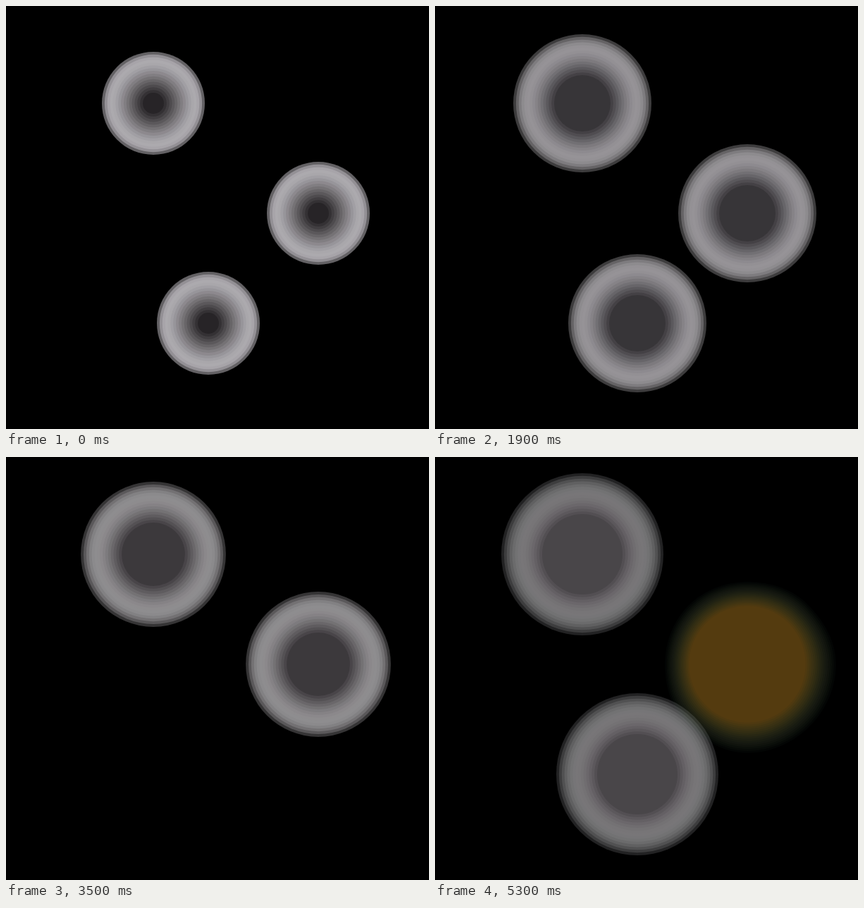
Recreate the animation shown at these times as an HTML page with a canvas. Size 600 by 600 pixels, loop 5400 ms.

```html
<!DOCTYPE html>
<html>
<head>
<meta charset="utf-8">
<title>Ripples</title>
<style>
html, body { margin: 0; width: 100%; height: 100%; overflow: hidden; background: #000; }
canvas { display: block; width: 600px; height: 600px; }
</style>
</head>
<body>
<canvas id="stage" width="600" height="600"></canvas>
<script>
const ctx = document.getElementById('stage').getContext('2d');
const LOOP = 5400, STEP = 100, LAYERS = 16, RAYS = 120, TURN = Math.PI * 2;

// Ripples grow by RANGE px, fade, and start again; the pace drifts a little.
const PACE = [[0, 13], [600, 50], [1200, 74.3], [1900, 114], [4600, 250.5], [5300, 283]];
const MIN_RADIUS = 60, RANGE = 76, DEPTH = 58, FADE_RADIUS = 137;
const LIGHT = [217, 214, 219], DARK = [24, 22, 24];

// Each outline is mirrored about the falling diagonal. Its reach is given every
// eighth of a turn, from lower right over the top to upper left.
const spots = [
  {
    x: 209, y: 138, start: 600, peak: 1200, end: 1900, core: 57, power: 2,
    reach: [101, 112, 91, 78, 85],
    edgeColor: [45, 75, 160], coreColor: [94, 0, 208]
  },
  {
    x: 443, y: 294, start: 3900, peak: 4600, end: 5500, core: 50, power: 2,
    reach: [107, 111, 88, 71, 76],
    edgeColor: [95, 140, 110], coreColor: [250, 127, 4]
  },
  {
    x: 287, y: 450, start: 2000, peak: 2600, end: 3510, core: 39, power: 6,
    reach: [61, 48, 64, 78, 73],
    edgeColor: [185, 38, 95], coreColor: [120, 0, 190]
  }
];

const lerp = (a, b, k) => a + (b - a) * k;
const mix = (a, b, k) => a.map((v, i) => lerp(v, b[i], k));
const rgb = c => `rgb(${c.map(Math.round)})`;
const smooth = k => (1 - Math.cos(Math.PI * k)) / 2;

function keyed(keys, t) {
  let i = 1;
  while (i < keys.length - 1 && t > keys[i][0]) i++;
  const [t0, v0] = keys[i - 1], [t1, v1] = keys[i];
  return lerp(v0, v1, (t - t0) / (t1 - t0));
}

// Reach of an outline at an angle in turns (0..1) from the lower right.
function reachAt(reach, turn) {
  const pos = Math.min(turn, 1 - turn) * 8, i = Math.min(3, Math.floor(pos));
  return lerp(reach[i], reach[i + 1], smooth(pos - i));
}

function drawRipple(spot, radius) {
  ctx.globalAlpha = Math.max(0, 0.0071 * (FADE_RADIUS - radius));
  for (let i = 0; i < LAYERS; i++) {
    const k = i / (LAYERS - 1);
    ctx.fillStyle = rgb(mix(LIGHT, DARK, k));
    ctx.beginPath();
    ctx.arc(spot.x, spot.y, radius - DEPTH * k, 0, TURN);
    ctx.fill();
  }
}

function drawBlob(spot, t) {
  const grow = Math.min(1, (t - spot.start) / (spot.peak - spot.start));
  const fade = Math.max(0, (t - spot.peak) / (spot.end - spot.peak));
  const scale = lerp(0.2, 1, grow);
  const core = lerp(spot.core, 92, fade), power = lerp(spot.power, 2, fade);

  const rays = Array.from({ length: RAYS }, (_, i) => {
    const turn = i / RAYS, angle = TURN * (1 / 8 - turn);
    const cos = Math.cos(angle), sin = Math.sin(angle);
    const norm = (Math.abs(cos) ** power + Math.abs(sin) ** power) ** (1 / power);
    const outer = lerp(reachAt(spot.reach, turn), 130, fade);
    return { cos, sin, outer: outer / norm, inner: core / norm };
  });

  ctx.globalAlpha = 0.28 * (1 - fade) ** 1.4;
  for (let i = 0; i < LAYERS; i++) {
    const k = i / (LAYERS - 1);
    ctx.fillStyle = rgb(mix(spot.edgeColor, spot.coreColor, Math.min(1, i / 14)));
    ctx.beginPath();
    for (const ray of rays) {
      const r = lerp(ray.outer, ray.inner, k) * scale;
      ctx.lineTo(spot.x + ray.cos * r, spot.y + ray.sin * r);
    }
    ctx.fill();
  }
}

function draw(t) {
  ctx.globalAlpha = 1;
  ctx.fillStyle = '#000';
  ctx.fillRect(0, 0, 600, 600);
  const radius = MIN_RADIUS + keyed(PACE, t) % RANGE;
  const isBlob = s => t >= s.start && t < s.end;
  for (const s of spots) if (!isBlob(s)) drawRipple(s, radius);
  for (const s of spots) if (isBlob(s)) drawBlob(s, t);
}

const begin = performance.now();
function tick() {
  const t = (performance.now() - begin) % LOOP;
  draw(Math.floor(t / STEP) * STEP);
  requestAnimationFrame(tick);
}
tick();
</script>
</body>
</html>
```
